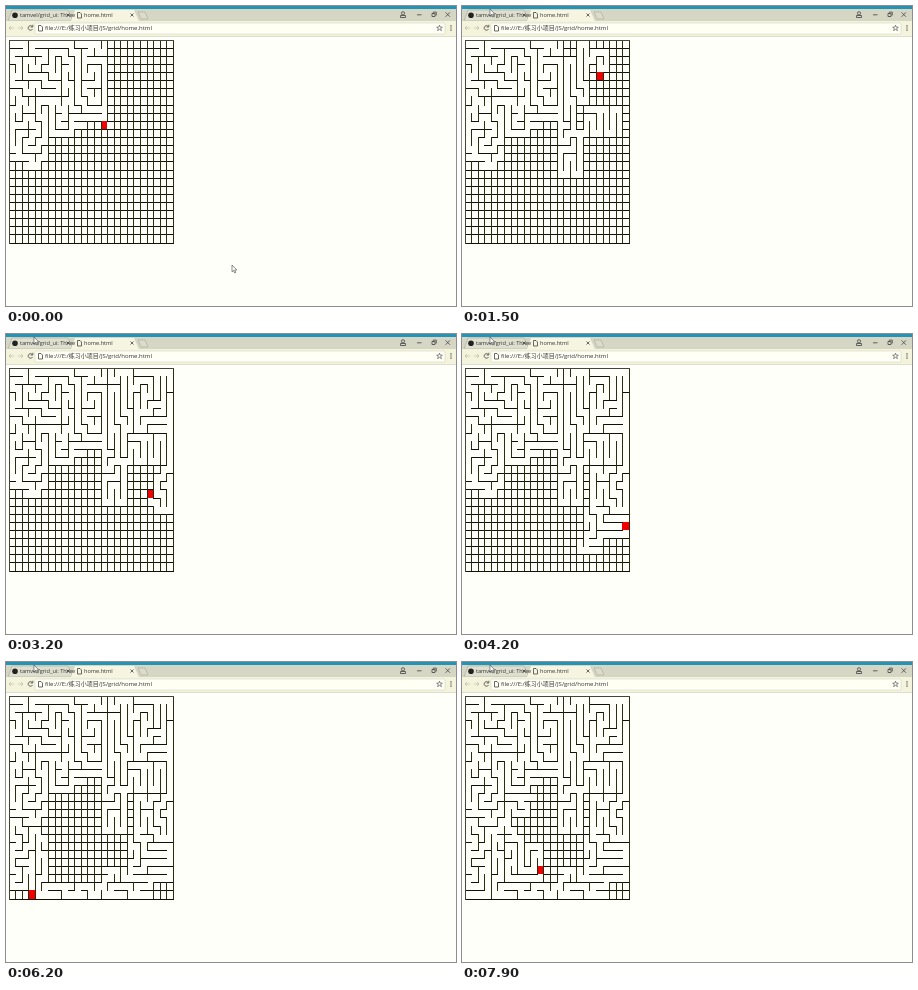
Recreate the animation shown at these times as an HTML page with a canvas. Size 450 by 300 pixels, loop 8000 ms.

```html
<!DOCTYPE html>
<html lang="en">
<head>
<meta charset="utf-8">
<title>Maze</title>
<style>
  html, body { margin: 0; width: 100%; height: 100%; overflow: hidden; background: #fffffa; }
  #stage { position: relative; width: 450px; height: 300px; overflow: hidden; }
  canvas, svg { position: absolute; left: 0; top: 0; display: block; }
  text { font: 5.6px "Open Sans", "Noto Sans CJK SC", "Noto Sans CJK", sans-serif; fill: #333; }
  .icon { fill: none; stroke: #444; stroke-width: .8; }
</style>
</head>
<body>
<div id="stage">
  <canvas id="maze" width="450" height="300"></canvas>
  <svg width="450" height="300" viewBox="0 0 450 300">
    <rect width="450" height="15" fill="#d5d6c4"/>
    <rect width="450" height="3" fill="#2593b5"/>
    <path d="M2 15 L6 4 H62 L67 15Z" fill="#dedfcf" stroke="#aaa99c" stroke-width=".6"/>
    <rect y="15" width="450" height="15" fill="#f4f4dc"/>
    <path d="M65 15.3 L69 4 H128 L133 15.3Z" fill="#f5f5e2"/>
    <path d="M132 6 H139 L142 13 H135Z" fill="#dcdccb" stroke="#aaa99c" stroke-width=".6"/>
    <rect x="29" y="17" width="410" height="11" rx="1.5" fill="#fffff5" stroke="#d5d5c4" stroke-width=".6"/>
    <path d="M0 30.5H450" stroke="#d2d2c0" stroke-width=".7"/>
    <circle cx="9" cy="9.3" r="2.8" fill="#222"/>
    <text x="14" y="11.3">tamvel/grid_ui: Three</text>
    <text x="78" y="11.3">home.html</text>
    <text x="39" y="24.3" style="font-size:6px">file:///E:/练习小项目/JS/grid/home.html</text>
    <g class="icon">
      <path d="M60.5 7.5l3 3m0-3l-3 3M124.5 7.5l3 3m0-3l-3 3"/>
      <path d="M71.5 6.5h2.5l1.5 1.5v4h-4zM32.5 19.5h2.5l1.5 1.5v4h-4z"/>
      <path d="M26.2 20.4a2.3 2.3 0 1 0 .4 2.5M26.8 18.8v2.2h-2.2"/>
      <path d="M8 22H3m2-2l-2 2 2 2M12 22h5m-2-2l2 2-2 2" stroke="#bdbdae"/>
      <circle cx="397" cy="7.3" r="1.6"/>
      <path d="M394.5 11.5v-2h5v2zM411 8.8h4.5M426 7.5h3v3h-3zM427.3 7.3v-1.2h3v3h-1M439.5 6.3l4.5 4.5m0-4.5l-4.5 4.5"/>
      <path d="M433.5 19.2l.8 2h2.1l-1.7 1.3.7 2.1-1.9-1.2-1.9 1.2.7-2.1-1.7-1.3h2.1z" stroke-width=".6"/>
    </g>
    <path d="M445 19.2v1.2m0 1v1.2m0 1v1.2" stroke="#444" stroke-width="1.2"/>
    <path id="cursor" d="M0 0V6.8L1.6 5.4 2.7 8 3.8 7.5 2.7 5H4.8Z" fill="#fff" stroke="#444" stroke-width=".6"/>
  </svg>
</div>
<script>
const SIZE = 25, LOOP = 8000, STEP = 100;
const ctx = document.getElementById('maze').getContext('2d');
const cursor = document.getElementById('cursor');
const px = c => Math.round(2.6 + c * 6.57);
const py = r => Math.round(33.6 + r * 8.12);

// Each phase carves its areas (left, top, right, bottom) until `end`,
// leaving the walker at `to`; `tall` favours vertical corridors.
const phases = [
  { end: 0, to: [14, 10], tall: 1, areas: [[0, 0, 14, 9], [14, 10, 15, 10], [0, 10, 11, 10], [0, 11, 9, 11], [0, 12, 5, 14], [2, 15, 4, 15]] },
  { end: 900, to: [15, 5], tall: 3, areas: [[15, 2, 16, 10], [14, 11, 17, 16], [18, 8, 23, 11]] },
  { end: 2200, to: [20, 5], tall: 3, areas: [[15, 0, 18, 10], [19, 0, 24, 2], [20, 3, 23, 5]] },
  { end: 2700, to: [23, 8], tall: 1, areas: [[19, 0, 24, 8]] },
  { end: 3600, to: [20, 17], tall: 1.3, areas: [[24, 8, 24, 11], [19, 12, 24, 17]] },
  { end: 4200, to: [24, 19], tall: 1, areas: [[18, 17, 24, 20], [17, 21, 20, 22]] },
  { end: 4500, to: [18, 22], tall: 1, areas: [[21, 21, 24, 22], [18, 23, 21, 24]] },
  { end: 5400, to: [4, 17], tall: 1, areas: [[14, 21, 17, 24], [5, 23, 13, 24], [4, 17, 5, 24]] },
  { end: 6300, to: [3, 16], tall: 1, areas: [[0, 16, 4, 24], [0, 15, 1, 15]] },
  { end: 7000, to: [10, 12], tall: 1, areas: [[5, 12, 9, 14], [5, 15, 6, 16], [10, 12, 10, 12]] },
  { end: 7200, to: [8, 18], tall: 2, areas: [[6, 16, 7, 17], [8, 17, 8, 18]] },
  { end: 7900, to: [11, 21], tall: 1, areas: [[6, 18, 11, 22]] }
];

let seed = 417;
function random() {
  seed = (seed * 1664525 + 1013904223) >>> 0;
  return seed / 4294967296;
}

const key = (c, r) => r * SIZE + c;
const seen = new Set([0]);
const trail = [[0, 0]];
const walk = [];
// Step at which the wall right of / below each cell opens.
const rightOpen = Array(SIZE * SIZE).fill(Infinity);
const belowOpen = rightOpen.slice();

function openWall([c, r], [d, s]) {
  const walls = c === d ? belowOpen : rightOpen;
  walls[key(Math.min(c, d), Math.min(r, s))] = walk.length;
}

function nextCell([c, r], phase) {
  const inside = ([x, y]) => phase.areas.some(a => x >= a[0] && y >= a[1] && x <= a[2] && y <= a[3]);
  return [[c + 1, r], [c - 1, r], [c, r + 1], [c, r - 1]]
    .filter(n => inside(n) && !seen.has(key(...n)))
    .map(n => ({ n, score: random() * (n[0] === c ? phase.tall : 1) }))
    .sort((a, b) => b.score - a.score)[0]?.n;
}

function carve(phase) {
  phase.first = walk.length;
  for (let i = trail.length - 1; i >= 0;) {
    const next = nextCell(trail[i], phase);
    if (!next) { i--; continue; }
    openWall(trail[i], next);
    seen.add(key(...next));
    trail.push(next);
    walk.push(next);
    i = trail.length - 1;
  }
  trail.push(phase.to);
  walk.push(phase.to);
  phase.last = walk.length - 1;
}
phases.forEach(carve);

function stepAt(t) {
  const i = phases.findIndex(p => t <= p.end);
  if (i < 0) return walk.length - 1;
  if (i === 0) return phases[0].last;
  const from = phases[i - 1], to = phases[i];
  const part = (t - from.end) / (to.end - from.end);
  return Math.round(from.last + part * (to.last - from.last));
}

function drawMaze(step) {
  ctx.fillStyle = '#fffffa';
  ctx.fillRect(0, 0, 450, 300);
  const [hc, hr] = walk[step];
  ctx.fillStyle = '#f00000';
  ctx.fillRect(px(hc), py(hr), px(hc + 1) - px(hc), py(hr + 1) - py(hr));
  for (let r = 0; r < SIZE; r++) {
    for (let c = 0; c < SIZE; c++) {
      const k = key(c, r), x = px(c + 1), y = py(r + 1);
      ctx.fillStyle = '#2c2c14';
      if (rightOpen[k] > step) ctx.fillRect(x, py(r), 1, y - py(r) + 1);
      ctx.fillStyle = '#10100a';
      if (belowOpen[k] > step) ctx.fillRect(px(c), y, x - px(c) + 1, 1);
    }
  }
  ctx.fillStyle = '#44443a';
  ctx.fillRect(px(0), py(0), px(SIZE) - px(0) + 1, 1);
  ctx.fillRect(px(0), py(0), 1, py(SIZE) - py(0) + 1);
}

function moveCursor(t) {
  const p = Math.min(1, Math.max(0, (t - 100) / 700));
  const e = p * p * (3 - 2 * p);
  cursor.setAttribute('transform', `translate(${226 - 198 * e} ${259 - 256 * e})`);
}

const start = performance.now();
let shown = -1;
function frame() {
  const t = Math.floor((performance.now() - start) % LOOP / STEP) * STEP;
  if (t !== shown) {
    drawMaze(stepAt(t));
    moveCursor(t);
    shown = t;
  }
  requestAnimationFrame(frame);
}
frame();
</script>
</body>
</html>
```
